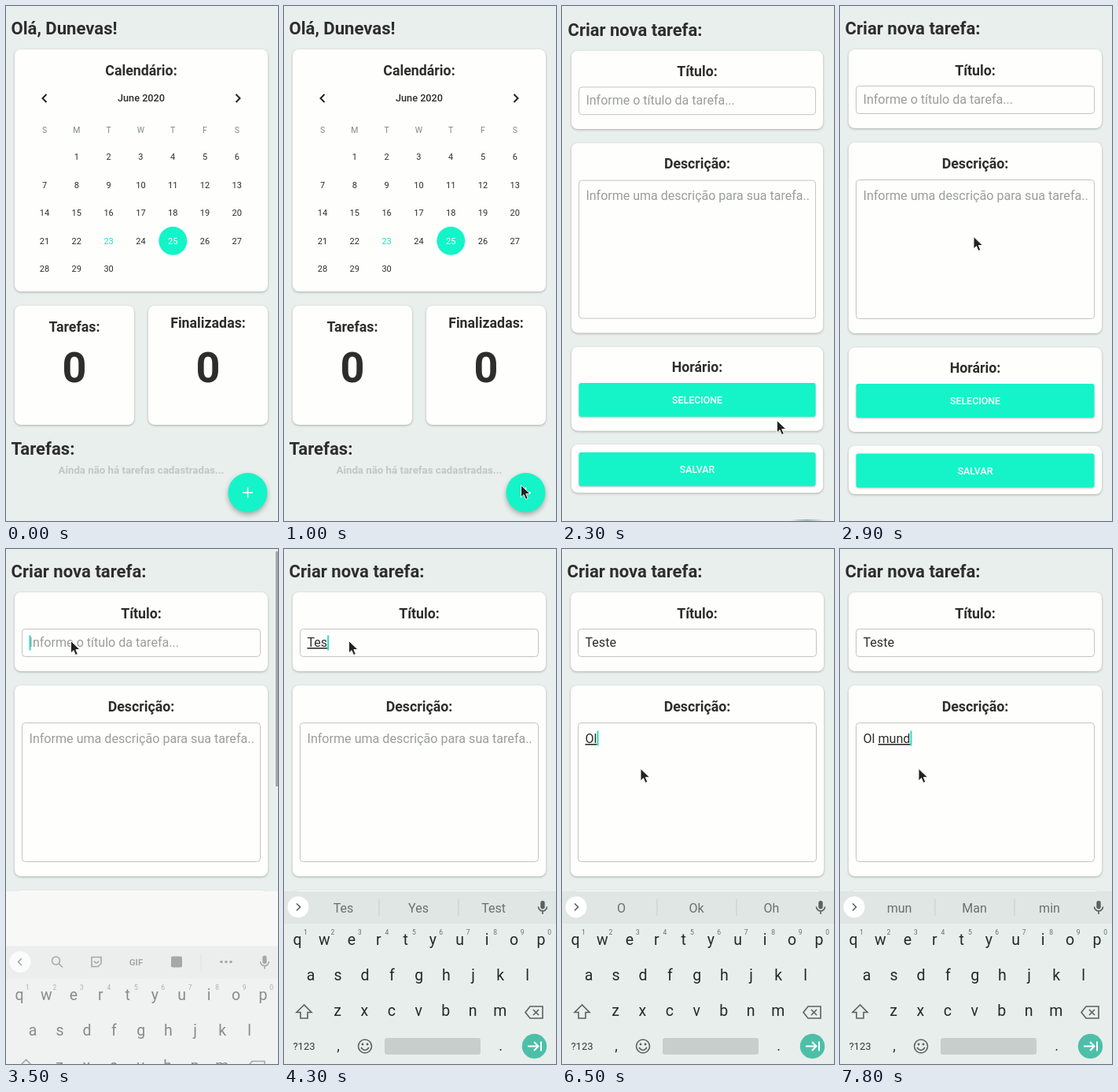
Animation, 346 px wide and 653 px high, one loop 8 s. Source, as an HTML page:

```html
<!DOCTYPE html>
<html lang="pt">
<head>
<meta charset="utf-8">
<title>Tarefas</title>
<style>
html, body { margin: 0; width: 100%; height: 100%; overflow: hidden; background: #e9efec; }
svg { display: block; width: 100%; height: 100%; font-family: Roboto, Arial, sans-serif; }
text { white-space: pre; }
.card { fill: #fefefd; filter: drop-shadow(0 1.5px 1.5px rgba(0,0,0,.27)); }
.btn { fill: #14f4c8; filter: drop-shadow(0 1px 1px rgba(0,0,0,.25)); }
.box { fill: none; stroke: #c2c4c3; }
.u { text-decoration: underline; }
.line { fill: none; stroke: #59625f; stroke-width: 1.6; }
.scr { transform-origin: 173px 326.5px; }
</style>
</head>
<body>
<svg viewBox="0 0 346 653" id="stage"></svg>
<script>
const DARK = '#2d2d2d', TEAL = '#14f4c8', GREY = '#59625f', PAGE = '#e9efec';

const text = (x, y, s, size, fill = DARK, weight = 400, anchor = 'middle', id = '') =>
  `<text ${id && `id="${id}"`} x="${x}" y="${y}" font-size="${size}" fill="${fill}" font-weight="${weight}" text-anchor="${anchor}">${s}</text>`;
const rect = (x, y, w, h, r, attrs) => `<rect x="${x}" y="${y}" width="${w}" height="${h}" rx="${r}" ${attrs}/>`;
const card = (x, y, w, h) => rect(x, y, w, h, 8, 'class="card"');
const disc = (x, y, r, attrs) => `<circle cx="${x}" cy="${y}" r="${r}" ${attrs}/>`;
const line = (d, attrs = '') => `<path class="line" d="${d}" ${attrs}/>`;
const page = rect(0, 0, 346, 653, 0, `fill="${PAGE}"`);
const heading = (y, s) => text(6.5, y, s, 22.1, DARK, 700, 'start');
const label = (x, y, s) => text(x, y, s, 17.8, DARK, 700);
const button = (y, h, s) =>
  rect(20.5, y, 303, h, 3, 'class="btn"') + text(172, y + h / 2 + 4.5, s, 12.4, '#fff', 500);

function calendar() {
  const col = i => 49 + 40.8 * i;
  let out = [...'SMTWTFS'].map((d, i) => text(col(i), 161, d, 10.5, '#80888a')).join('');
  out += disc(212.3, 297.8, 18, `fill="${TEAL}"`);
  for (let d = 1; d <= 30; d++) {
    const fill = d === 25 ? '#fff' : d === 23 ? '#27dcbd' : DARK;
    out += text(col(d % 7), 195 + 35.6 * Math.floor(d / 7), d, 11, fill);
  }
  return out;
}

const home = page + heading(36, 'Olá, Dunevas!') +
  card(11, 55, 322, 307) + label(172, 87.5, 'Calendário:') + text(172, 121, 'June 2020', 12.7, DARK, 500) +
  line('M51.5 112 46.5 117 51.5 122M292.5 112 297.5 117 292.5 122', 'style="stroke:#222;stroke-width:2"') +
  calendar() +
  card(11, 380, 152, 151) + card(181, 380, 152, 151) +
  label(87, 412.5, 'Tarefas:') + label(257, 408, 'Finalizadas:') +
  text(87, 477, 0, 54, DARK, 700) + text(257, 477, 0, 54, DARK, 700) +
  heading(568.5, 'Tarefas:') +
  text(172, 593, 'Ainda não há tarefas cadastradas...', 13.25, '#c1c7c7', 700) +
  disc(307.5, 617, 25, `id="fab" style="filter:drop-shadow(0 3px 3px rgba(0,0,0,.3))"`) +
  line('M301 617H314M307.5 610.5V623.5', 'style="stroke:#fff"');

const form = page + heading(36, 'Criar nova tarefa:') +
  card(11, 55, 322, 100) + label(172, 87.5, 'Título:') + rect(20.5, 101.5, 303, 35, 4, 'class="box"') +
  card(11, 173, 322, 242) + label(172, 205.5, 'Descrição:') + rect(20.5, 220.5, 303, 176, 4, 'class="box"') +
  card(11, 433, 322, 107) + label(172, 465, 'Horário:') + button(479, 43, 'SELECIONE') +
  card(11, 557.5, 322, 61.5) + button(567.5, 43, 'SALVAR') +
  text(29.5, 124, '', 16.1, DARK, 400, 'start', 'name') +
  text(29.5, 246, '', 16.1, DARK, 400, 'start', 'desc') +
  rect(0, 0, 2, 19, 0, 'id="caret" fill="#2bdcc0"');

const keyRow = (keys, x, y) => [...keys].map((k, i) => text(x + 34.45 * i, y, k, 19.5, '#222b29')).join('');

const tools = disc(63.5, 452.5, 5, 'class="line"') + line('M67 456 72 461') +
  line('M109 448H121V456L117 460H109ZM112 453Q115 458 118 453') +
  text(165.5, 458.5, 'GIF', 11.5, GREY, 700) +
  rect(210, 447, 14, 14, 2, `fill="${GREY}"`) + line('M248 444V465', 'style="stroke:#c8cfcc;stroke-width:1"') +
  [274, 280, 286].map(x => disc(x, 454, 1.8, `fill="${GREY}"`)).join('');

const keyboard = rect(0, 434, 346, 219, 0, `fill="#e8eeeb"`) + rect(0, 434, 346, 41, 0, 'fill="#e0e6e4"') +
  disc(18, 454, 13.5, 'fill="#fff"') + line('', 'id="chevron"') +
  `<g id="tools">${tools}</g><g id="words">` +
  line('M121 444V465M222 444V465', 'style="stroke:#c6cdca;stroke-width:1"') +
  [75.5, 171, 266.5].map(x => text(x, 460.5, '', 16, '#68716f')).join('') + '</g>' +
  rect(326.3, 446, 5.4, 10.5, 2.7, `fill="${GREY}"`) + line('M323.5 453.5a5.5 5.5 0 0 0 11 0M329 459V463') +
  keyRow('qwertyuiop', 17, 502) + keyRow('asdfghjkl', 34, 547) + keyRow('zxcvbnm', 68, 592) +
  [...'1234567890'].map((d, i) => text(27.5 + 34.45 * i, 489, d, 8.5, '#65706c')).join('') +
  line('M25.5 578 16 587.5H21V595H30V587.5H35Z') +
  line('M307 587.5 313 580H329V595H313ZM317 584 324 591M324 584 317 591') +
  text(25.5, 635, '?123', 13, '#333c3a') + text(69, 636, ',', 18) + text(275.5, 636, '.', 18) +
  disc(103, 630.5, 8.5, 'class="line"') + line('M98 632Q103 639 108 632') +
  disc(100, 628, 1.4, `fill="${GREY}"`) + disc(106, 628, 1.4, `fill="${GREY}"`) +
  rect(128, 620, 122, 21, 3, 'fill="#c8cecc"') + disc(318.5, 630.5, 15.7, 'fill="#4dbfa8"') +
  line('M310 630.5H323M318 625 323.5 630.5 318 636M327 624.5V636.5', 'style="stroke:#fff;stroke-width:2"');

stage.innerHTML = `<g id="homeScr" class="scr">${home}</g><g id="formScr" class="scr">${form}</g>` +
  rect(0, 434, 346, 219, 0, 'id="blank" fill="#f8f8f7"') + `<g id="keys">${keyboard}</g>` +
  rect(343, 3, 3, 298, 0, 'id="bar" fill="#a3a7a6"') +
  '<path id="pointer" d="M.5.5V16L4 12.6 6.5 18.5 9.3 17.3 6.8 11.6H12Z" fill="#222" stroke="#fff" stroke-width=".9"/>';

const $ = id => document.getElementById(id);
const show = (id, on) => $(id).setAttribute('opacity', +on);

// Each row starts with its time in ms.
const names = [[0, ''], [4100, 'Te'], [4300, 'Tes'], [4500, 'Test'], [4700, 'Teste']];
const descs = [[0, '', ''], [6300, '', 'O'], [6500, '', 'Ol'], [6800, 'Ol ', ''],
  [7100, 'Ol ', 'm'], [7300, 'Ol ', 'mu'], [7800, 'Ol ', 'mund']];
const hints = [[0, ''], [4100, 'Te Ten Tea'], [4300, 'Tes Yes Test'], [4500, 'Test Text Tests'],
  [4700, 'Teste Tested Tester'], [5400, ''], [6400, 'O I Oh'], [6500, 'O Ok Oh'],
  [6900, 'I the is'], [7500, 'mu My much'], [7800, 'mun Man min']];
const path = [[500, 83.5, 487.5], [1000, 301, 607], [1900, 301, 607], [2100, 290, 588], [2300, 273, 525],
  [2500, 257, 468], [2600, 257, 468], [3200, 82, 116], [4400, 82, 116], [4900, 97.5, 265],
  [5200, 97.5, 265], [5300, 98.5, 269], [5700, 99.5, 278]];
const homeZoom = [[2000, 1], [2100, 1.003], [2200, 1.015], [2300, 1.03]];
const formZoom = [[2100, .9, 0], [2200, .965, .6], [2300, .9938, 1], [2400, .999, 1], [2500, 1, 1]];
const rise = [[3300, 219, 0], [3400, 140, .2], [3500, 69.5, .52], [3600, 18, .85], [3700, 0, 1]];

const current = (rows, t) => rows.findLast(r => r[0] <= t).slice(1);

function tween(rows, t) {
  const i = rows.findIndex(r => r[0] > t);
  if (i < 1) return (i ? rows.at(-1) : rows[0]).slice(1);
  const a = rows[i - 1], b = rows[i], k = (t - a[0]) / (b[0] - a[0]);
  return a.slice(1).map((v, j) => v + (b[j + 1] - v) * k);
}

function field(id, done, typing, hint, hintFill) {
  const el = $(id), empty = !(done + typing);
  el.setAttribute('fill', empty ? hintFill : DARK);
  el.innerHTML = empty ? hint : `${done}<tspan class="u">${typing}</tspan>`;
  return empty ? 0 : el.getComputedTextLength();
}

function draw(t) {
  $('homeScr').style.transform = `scale(${tween(homeZoom, t)})`;
  $('fab').setAttribute('fill', t < 1900 ? TEAL : '#13e0b8');

  const [zoom, alpha] = tween(formZoom, t);
  $('formScr').style.transform = `scale(${zoom})`;
  show('formScr', alpha);

  const inDesc = t >= 5300, name = current(names, t)[0], [done, typing] = current(descs, t);
  const nameEnd = field('name', inDesc ? name : '', inDesc ? '' : name, 'Informe o título da tarefa...', '#9a9d9b');
  const descEnd = field('desc', done, typing, 'Informe uma descrição para sua tarefa..', inDesc ? '#7b7e7c' : '#9a9d9b');
  $('caret').setAttribute('x', 29.5 + (inDesc ? descEnd : nameEnd));
  $('caret').setAttribute('y', inDesc ? 230.5 : 109.5);
  show('caret', t >= 3400);

  const [drop, solid] = tween(rise, t);
  $('keys').setAttribute('transform', `translate(0 ${drop})`);
  show('keys', solid);
  show('blank', t >= 3400);
  show('bar', t >= 3400 && t < 3700 ? (t < 3600 ? 1 : .5) : 0);

  const words = current(hints, t)[0].split(' '), typed = words.length > 1;
  show('words', typed);
  show('tools', !typed);
  $('chevron').setAttribute('d', typed ? 'M16 449.5 20.5 454 16 458.5' : 'M20 449.5 15.5 454 20 458.5');
  document.querySelectorAll('#words text').forEach((el, i) => el.textContent = words[i] || '');

  $('pointer').setAttribute('transform', `translate(${tween(path, t)})`);
  show('pointer', t >= 400);
}

let shown = -1;
function tick() {
  const t = Math.floor(performance.now() % 8000 / 100) * 100;
  if (t !== shown) draw(shown = t);
  requestAnimationFrame(tick);
}
tick();
</script>
</body>
</html>
```
